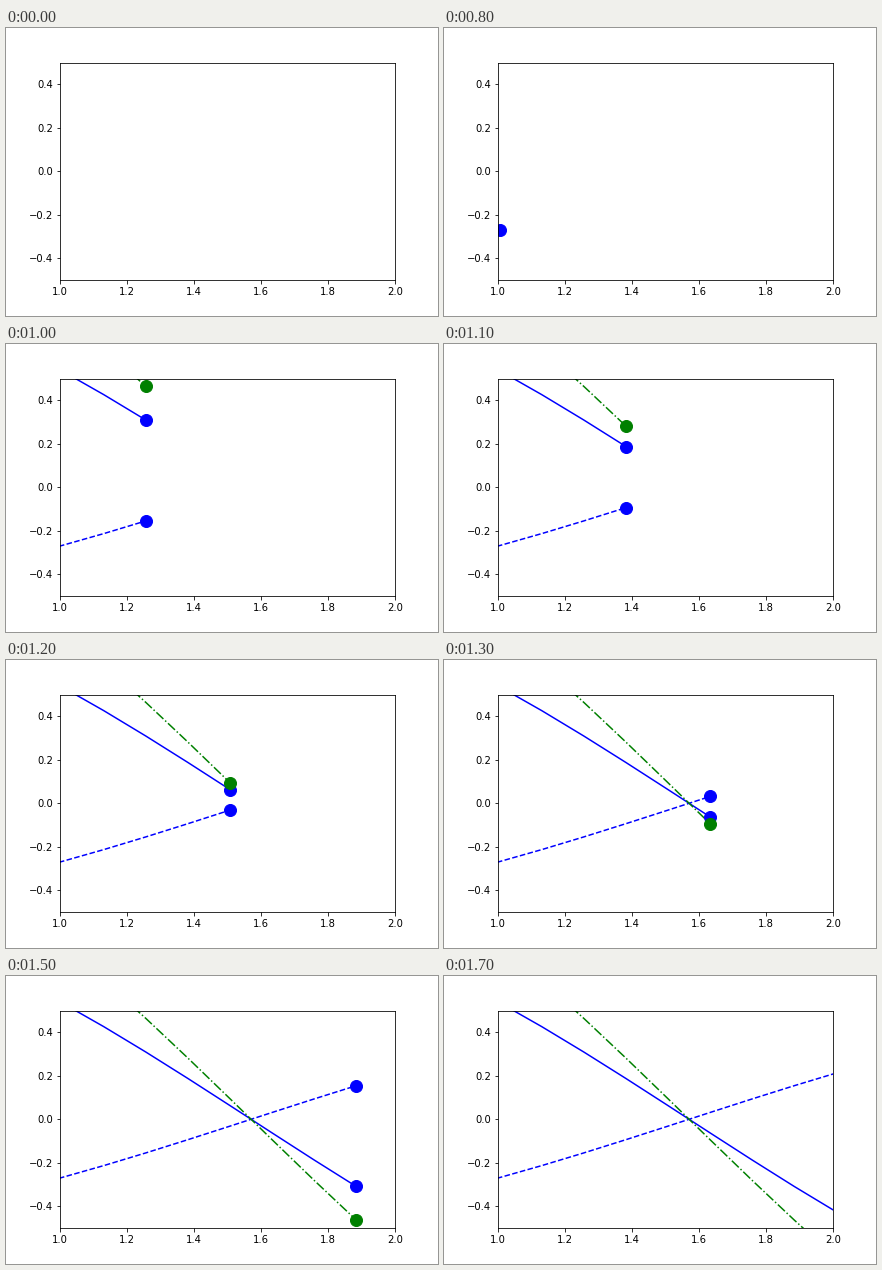
A matplotlib script for the animation above (5100 ms loop, 432 px wide and 288 px high).

```python
import numpy as np
import matplotlib.pyplot as plt
from matplotlib.animation import FuncAnimation

STEPS = 50
X = np.linspace(0, 2 * np.pi, STEPS + 1)
CURVES = [(1.0, "b", "-"), (-0.5, "b", "--"), (1.5, "g", "-.")]  # amplitude, colour, style

plt.rcParams["font.family"] = "DejaVu Sans"
fig, ax = plt.subplots(figsize=(6, 4), dpi=72)
fig.subplots_adjust(left=0.125, right=0.9, bottom=0.125, top=0.88)
ax.set_xlim(1, 2)
ax.set_ylim(-0.5, 0.5)

trails = [ax.plot([], [], color=c, linestyle=style)[0] for _, c, style in CURVES]
heads = [ax.plot([], [], "o", color=c, markersize=12)[0] for _, c, _ in CURVES]


def update(step):
    x = X[:step + 1]
    for (amplitude, _, _), trail, head in zip(CURVES, trails, heads):
        y = amplitude * np.cos(x)
        trail.set_data(x, y)
        head.set_data(x[-1:], y[-1:])
    return trails + heads


anim = FuncAnimation(fig, update, frames=STEPS + 1, interval=100, repeat=True, repeat_delay=0)
plt.show()
```
